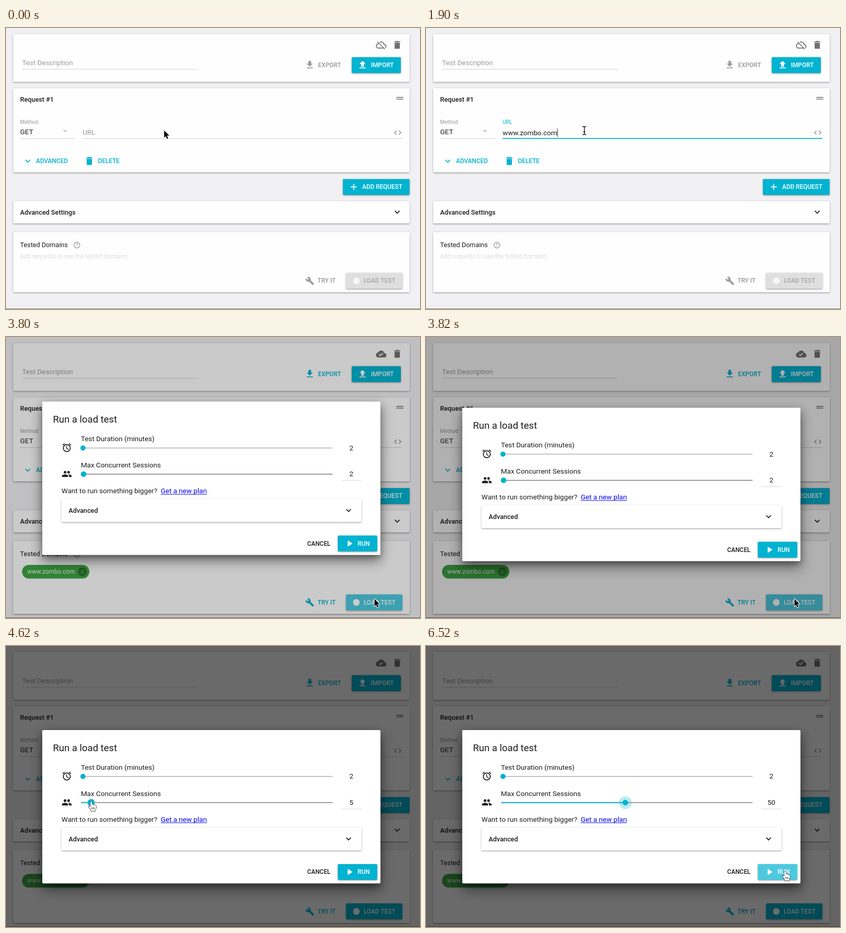
Animation, 800 px wide and 545 px high, one loop 6620 ms. Source, as an HTML page with a canvas:

```html
<!DOCTYPE html>
<html lang="en">
<head>
<meta charset="utf-8">
<title>Load test form</title>
<style>
  html, body { margin: 0; width: 100%; height: 100%; overflow: hidden; background: #f1f0f2; }
  canvas { display: block; width: 800px; height: 545px; }
</style>
</head>
<body>
<canvas id="stage" width="800" height="545"></canvas>
<script>
const ctx = document.getElementById('stage').getContext('2d');
const LOOP = 6620;
const TEAL = '#00b3d0', INK = '#1c1c1c', GREY = '#9a9a9a', RULE = '#cfcfcf';
const BODY = 13.6, HEAD = 12.75, SMALL = 11.9, LABEL = 10.2;
const ADDRESS = 'www.zombo.com';

// Moments of the story, in ms
const FOCUS = 100, TYPE = 600, KEY = 100, READY = 2400, BLUR = 3400;
const OPEN = 3769, GRAB = 4460, DROP = 5506, RELEASE = 5640;

// Icons on a 24 unit grid
const icons = {
  cloudOff: 'M19.35 10.04C18.67 6.59 15.64 4 12 4c-1.48 0-2.85.43-4.01 1.17l1.46 1.46C10.21 6.23 11.08 6 12 6c3.04 0 5.5 2.46 5.5 5.5v.5H19c1.66 0 3 1.34 3 3 0 1.13-.64 2.11-1.56 2.62l1.45 1.45C23.16 18.16 24 16.68 24 15c0-2.64-2.05-4.78-4.65-4.96zM3 5.27l2.75 2.74C2.56 8.15 0 10.77 0 14c0 3.31 2.69 6 6 6h11.73l2 2L21 20.73 4.27 4zM7.73 10l8 8H6c-2.21 0-4-1.79-4-4s1.79-4 4-4z',
  cloudDone: 'M19.35 10.04C18.67 6.59 15.64 4 12 4 9.11 4 6.6 5.64 5.35 8.04 2.34 8.36 0 10.91 0 14c0 3.31 2.69 6 6 6h13c2.76 0 5-2.24 5-5 0-2.64-2.05-4.78-4.65-4.96zM10 17l-3.5-3.5 1.41-1.41L10 14.17 15.18 9l1.41 1.41z',
  trash: 'M6 19c0 1.1.9 2 2 2h8c1.1 0 2-.9 2-2V7H6zM19 4h-3.5l-1-1h-5l-1 1H5v2h14z',
  download: 'M19 9h-4V3H9v6H5l7 7zM5 18v2h14v-2z',
  upload: 'M9 16h6v-6h4l-7-7-7 7h4zM5 18h14v2H5z',
  chevron: 'M16.59 8.59L12 13.17 7.41 8.59 6 10l6 6 6-6z',
  plus: 'M19 13h-6v6h-2v-6H5v-2h6V5h2v6h6z',
  wrench: 'M22.7 19l-9.1-9.1c.9-2.3.4-5-1.5-6.9-2-2-5-2.4-7.4-1.3L9 6 6 9 1.6 4.7C.4 7.1.9 10.1 2.9 12.1c1.9 1.9 4.6 2.4 6.9 1.5l9.1 9.1c.4.4 1 .4 1.4 0l2.3-2.3c.5-.4.5-1.1.1-1.4z',
  code: 'M9.4 16.6L4.8 12l4.6-4.6L8 6l-6 6 6 6zM14.6 16.6l4.6-4.6-4.6-4.6L16 6l6 6-6 6z',
  handle: 'M20 9H4v2h16zM4 15h16v-2H4z',
  people: 'M19 8a3 3 0 1 0-6 0 3 3 0 1 0 6 0zM11 8a3 3 0 1 0-6 0 3 3 0 1 0 6 0zM8 13c-2.33 0-7 1.17-7 3.5V19h14v-2.5c0-2.33-4.67-3.5-7-3.5zM16 13l-1 .05c1.16.84 2 1.97 2 3.45V19h6v-2.5c0-2.33-4.67-3.5-7-3.5z',
  play: 'M8 5v14l11-7z'
};
for (const name in icons) icons[name] = new Path2D(icons[name]);

const pointers = {
  arrow: new Path2D('M0 0V14.2L3.2 11.2 5.5 16.6 7.9 15.6 5.6 10.3H10z'),
  hand: new Path2D('M-1.7 1.8C-1.7-.5 1.6-.5 1.6 1.8V6C2.2 5 4.2 5.2 4.4 6.4 5 5.7 6.8 6 7 7.3 7.8 6.8 9.4 7.3 9.4 8.8V12L7.6 15.4V18H-.6V16.2L-3 12.8-5.2 9.8C-5.6 8.2-3.8 7.6-2.8 8.8L-1.7 10z')
};

const clamp = v => Math.max(0, Math.min(1, v));
const span = (t, from, length) => clamp((t - from) / length);
const smooth = u => u * u * (3 - 2 * u);
const easeOut = u => 1 - (1 - u) ** 4;
const mix = (a, b, u) => a + (b - a) * u;

function text(str, x, cy, size, color = INK, weight = 400, align = 'left') {
  ctx.font = `${weight} ${size}px Roboto, sans-serif`;
  ctx.fillStyle = color;
  ctx.textAlign = align;
  ctx.fillText(str, x, cy + size * 0.355);
  return ctx.measureText(str).width;
}

function icon(name, cx, cy, color, size = 20.4) {
  ctx.save();
  ctx.translate(cx - size / 2, cy - size / 2);
  ctx.scale(size / 24, size / 24);
  ctx.fillStyle = color;
  ctx.fill(icons[name]);
  ctx.restore();
}

function rect(x, y, w, h, color) {
  ctx.fillStyle = color;
  ctx.fillRect(x, y, w, h);
}

function disc(x, y, r, color) {
  ctx.fillStyle = color;
  ctx.beginPath();
  ctx.arc(x, y, r, 0, 7);
  ctx.fill();
}

function line(color, width, ...points) {
  ctx.strokeStyle = color;
  ctx.lineWidth = width;
  ctx.beginPath();
  points.forEach(([x, y], i) => i ? ctx.lineTo(x, y) : ctx.moveTo(x, y));
  ctx.stroke();
}

function ring(x, y, r, color, width) {
  ctx.strokeStyle = color;
  ctx.lineWidth = width;
  ctx.beginPath();
  ctx.arc(x, y, r, 0, 7);
  ctx.stroke();
}

function panel(x, y, w, h, color = '#fefefe', shadows = [[1, 4, 0.22], [1.5, 1.5, 0.18]], r = 1.7) {
  ctx.save();
  ctx.fillStyle = color;
  ctx.beginPath();
  ctx.roundRect(x, y, w, h, r);
  for (const [dy, blur, alpha] of shadows) {
    ctx.shadowOffsetY = dy;
    ctx.shadowBlur = blur;
    ctx.shadowColor = `rgba(0,0,0,${alpha})`;
    ctx.fill();
  }
  ctx.restore();
}

function button(x, y, w, label, labelX, color = TEAL, ink = '#fff', raised = true) {
  panel(x, y, w, 30.5, color, raised ? undefined : [[0, 0, 0]]);
  text(label, labelX, y + 15.2, SMALL, ink, 500);
}

function drawHeader(ready) {
  panel(14, 12, 766, 92.5);
  icon(ready ? 'cloudDone' : 'cloudOff', 725, 33, '#717171');
  icon('trash', 756, 32.7, '#717171');
  text('Test Description', 31, 67, BODY, GREY);
  rect(31, 79.5, 340, 1, RULE);
  const ink = ready ? TEAL : GREY;
  icon('download', 587, 71.5, ink);
  text('EXPORT', 603, 71.7, SMALL, ink, 500);
  button(668, 56.7, 95, 'IMPORT', 705.3);
  icon('upload', 689, 71.5, '#fff');
}

function drawAddress(t) {
  const u = smooth(span(t, FOCUS, 250));
  const focused = t >= FOCUS && t < BLUR;
  const count = Math.max(0, Math.min(ADDRESS.length, Math.floor((t - TYPE) / KEY) + 1));
  text('URL', 148, mix(202, 182, u), mix(BODY, LABEL, u), focused ? TEAL : GREY);
  rect(148, 214, 618, 1, RULE);
  if (focused) rect(457 - 309 * u, 213.4, 618 * u, 1.7, TEAL);
  const width = text(ADDRESS.slice(0, count), 148, 203, BODY);
  const typing = t >= TYPE && t < TYPE + KEY * ADDRESS.length;
  const lit = Math.floor((t - 1600) / 530) % 2 === 0;
  if (focused && u > 0.3 && (typing || lit)) rect(148 + width, 195, 1, 16, INK);
}

function drawRequest(t) {
  panel(14, 117, 766, 163);
  text('Request #1', 27.3, 138.3, HEAD, INK, 500);
  icon('handle', 761, 136.3, '#7b7b7b');
  text('Method', 27.3, 182, LABEL, GREY);
  text('GET', 27.3, 201.3, BODY);
  ctx.fillStyle = '#c6c6c6';
  ctx.fill(new Path2D('M109.8 198h8.5l-4.25 4.3z'));
  rect(27.5, 214, 106, 1, RULE);
  drawAddress(t);
  icon('code', 757, 203, '#8b8b8b', 17);
  icon('chevron', 42, 258, TEAL);
  text('ADVANCED', 58, 258, SMALL, TEAL, 500);
  icon('trash', 161, 258, TEAL);
  text('DELETE', 177.7, 258, SMALL, TEAL, 500);
  button(651, 293, 129, 'ADD REQUEST', 688.3);
  icon('plus', 672, 308.2, '#fff');
  panel(14, 336, 766, 43);
  text('Advanced Settings', 27.3, 357.7, HEAD, INK, 500);
  icon('chevron', 756, 357, INK);
}

function drawDomains(ready, hover) {
  panel(14, 396, 766, ready ? 141 : 116.5);
  text('Tested Domains', 27.3, 420.7, HEAD);
  ring(137, 421, 5.7, GREY, 1.2);
  text('?', 137, 421, 9, GREY, 500, 'center');
  const y = ready ? 514.5 : 490;
  if (ready) {
    panel(31, 442, 130, 26.5, '#3ea544', [[0, 0, 0]], 13.2);
    text(ADDRESS, 41, 455, SMALL, '#f4fbf4');
    disc(147.6, 455.3, 8.6, '#2c7431');
    line('#3ea544', 1.6, [144, 451.7], [151.2, 458.9]);
    line('#3ea544', 1.6, [151.2, 451.7], [144, 458.9]);
  } else {
    text('Add requests to see the tested domains', 27.3, 443, SMALL, '#cfcfcf', 300);
  }
  const ink = ready ? TEAL : GREY;
  icon('wrench', 587.2, y + 0.5, ink, 17.5);
  text('TRY IT', 602, y, SMALL, ink, 500);
  const fill = !ready ? '#dfdfdf' : hover ? '#4dcadf' : TEAL;
  button(657, y - 15, 109, 'LOAD TEST', 691.3, fill, ready ? '#fff' : '#a6a6a6');
  disc(677, y + 0.3, 6.5, ready ? '#fff' : '#f6f6f6');
}

function drawAlarm(x, y) {
  ring(x, y + 0.8, 6.8, INK, 1.7);
  line(INK, 1.4, [x - 0.2, y - 3.4], [x - 0.2, y + 1.3], [x + 3.6, y + 3.6]);
  for (const s of [-1, 1]) line(INK, 1.7, [x + s * 8.1, y - 4.7], [x + s * 4.2, y - 8]);
}

function drawSlider(y, knobX, r, track, halo) {
  rect(145, y - 0.9, 486, 1.8, track);
  rect(145, y - 0.9, knobX - 145, 1.8, TEAL);
  if (halo) disc(knobX, y, 12.3, 'rgba(0,179,208,.27)');
  disc(knobX, y, r, TEAL);
}

const sessionsAt = t => mix(2, 50, smooth(span(t, GRAB, DROP - GRAB)));

function drawDialog(t, hover) {
  ctx.save();
  ctx.globalAlpha = clamp(span(t, OPEN - 1, 24));
  ctx.translate(0, -64 * (1 - easeOut(span(t, OPEN, 250))));
  panel(70.3, 163.3, 653, 297, '#fff', [[14, 24, 0.3], [6, 22, 0.25], [5, 8, 0.25]]);
  text('Run a load test', 90.7, 197.3, 18.7);
  drawAlarm(117.5, 252.3);
  icon('people', 117.5, 303.3, INK);
  text('Test Duration (minutes)', 144.7, 235.3, BODY);
  drawSlider(253, 148.7, 5, '#bdbdbd', false);
  text('2', 667.3, 252.5, BODY, INK, 400, 'center');

  const value = Math.round(sessionsAt(t));
  text('Max Concurrent Sessions', 144.7, 286.3, BODY);
  const held = t >= GRAB && t < RELEASE;
  drawSlider(303.7, 145 + (value - 1) * 4.9, held ? 7 : 5.4, '#939393', t >= RELEASE);
  text(String(value), 667.3, 303.3, BODY, INK, 400, 'center');
  rect(648, 315.5, 39, 1, '#d8d8d8');

  text('Want to run something bigger?', 107.3, 336.3, BODY);
  const width = text('Get a new plan', 299, 336.3, BODY, '#0000ee');
  rect(299, 342.3, width, 1, '#0000ee');
  panel(107.5, 352.3, 579.5, 44.2, '#fff');
  text('Advanced', 121, 374, HEAD, INK, 500);
  icon('chevron', 662, 374, INK);
  text('CANCEL', 582, 438.2, SMALL, INK, 500);
  button(641.3, 423, 76, 'RUN', 679.3, hover ? '#4dcadf' : TEAL);
  icon('play', 663.7, 438.3, '#fff');
  ctx.restore();
}

// Pointer rests and moves: start, end, x, y
const moves = [
  [2250, 3050, 712, 508],
  [3820, 3980, 180, 257],
  [4120, 4400, 150, 302],
  [GRAB, DROP, 385, 302],
  [5700, 6180, 694, 437]
];

function pointerAt(t) {
  let x = 305.5, y = 198.5;
  for (const [from, to, nx, ny] of moves) {
    const u = smooth(span(t, from, to - from));
    x = mix(x, nx, u);
    y = mix(y, ny, u);
  }
  return { x, y };
}

const inside = (p, x, y, w, h) => p.x >= x && p.x <= x + w && p.y >= y && p.y <= y + h;

function drawPointer(p, kind) {
  ctx.save();
  ctx.translate(p.x, p.y);
  ctx.lineJoin = 'round';
  if (kind === 'beam') {
    ctx.translate(0.5, 0.5);
    for (const [color, w] of [['#fff', 3], ['#111', 1.4]]) {
      line(color, w, [-3.5, -8], [-1, -7.5], [0, -6.5], [1, -7.5], [3.5, -8]);
      line(color, w, [-3.5, 8], [-1, 7.5], [0, 6.5], [1, 7.5], [3.5, 8]);
      line(color, w, [0, -6.5], [0, 6.5]);
      line(color, w, [-2, 2.5], [2, 2.5]);
    }
  } else {
    const hand = kind === 'hand';
    ctx.lineWidth = hand ? 1.3 : 2;
    ctx.strokeStyle = hand ? '#111' : '#fff';
    ctx.fillStyle = hand ? '#fff' : '#080808';
    ctx.stroke(pointers[kind]);
    ctx.fill(pointers[kind]);
    if (hand) for (const x of [0.8, 3.2, 5.6]) line('#111', 0.9, [x, 11], [x, 14.5]);
  }
  ctx.restore();
}

function draw(t) {
  const p = pointerAt(t);
  const ready = t >= READY, open = t >= OPEN;
  const overLoad = ready && inside(p, 657, 499, 109, 31) && t < 3840;
  const overRun = open && inside(p, 641, 423, 76, 31);
  const overSlider = open && inside(p, 143, 296, 488, 13);
  const overField = !open && t >= FOCUS && inside(p, 148, 188, 600, 27);

  rect(0, 0, 800, 545, '#f1f0f2');
  drawHeader(ready);
  drawRequest(t);
  drawDomains(ready, overLoad);
  rect(0, 544, 800, 1, '#858585');
  if (open) {
    rect(0, 0, 800, 545, `rgba(0,0,0,${0.58 * easeOut(span(t, OPEN, 300))})`);
    drawDialog(t, overRun);
  }
  const hand = overRun || overSlider || (overLoad && !open);
  drawPointer(p, hand ? 'hand' : overField ? 'beam' : 'arrow');
}

function frame(now) {
  const t = now % LOOP;
  const step = t < 3600 || t >= 6220 ? 100 : 20;
  const base = t >= 6220 ? 6220 : 0;
  draw(base + Math.floor((t - base) / step) * step);
  requestAnimationFrame(frame);
}
requestAnimationFrame(frame);
</script>
</body>
</html>
```
